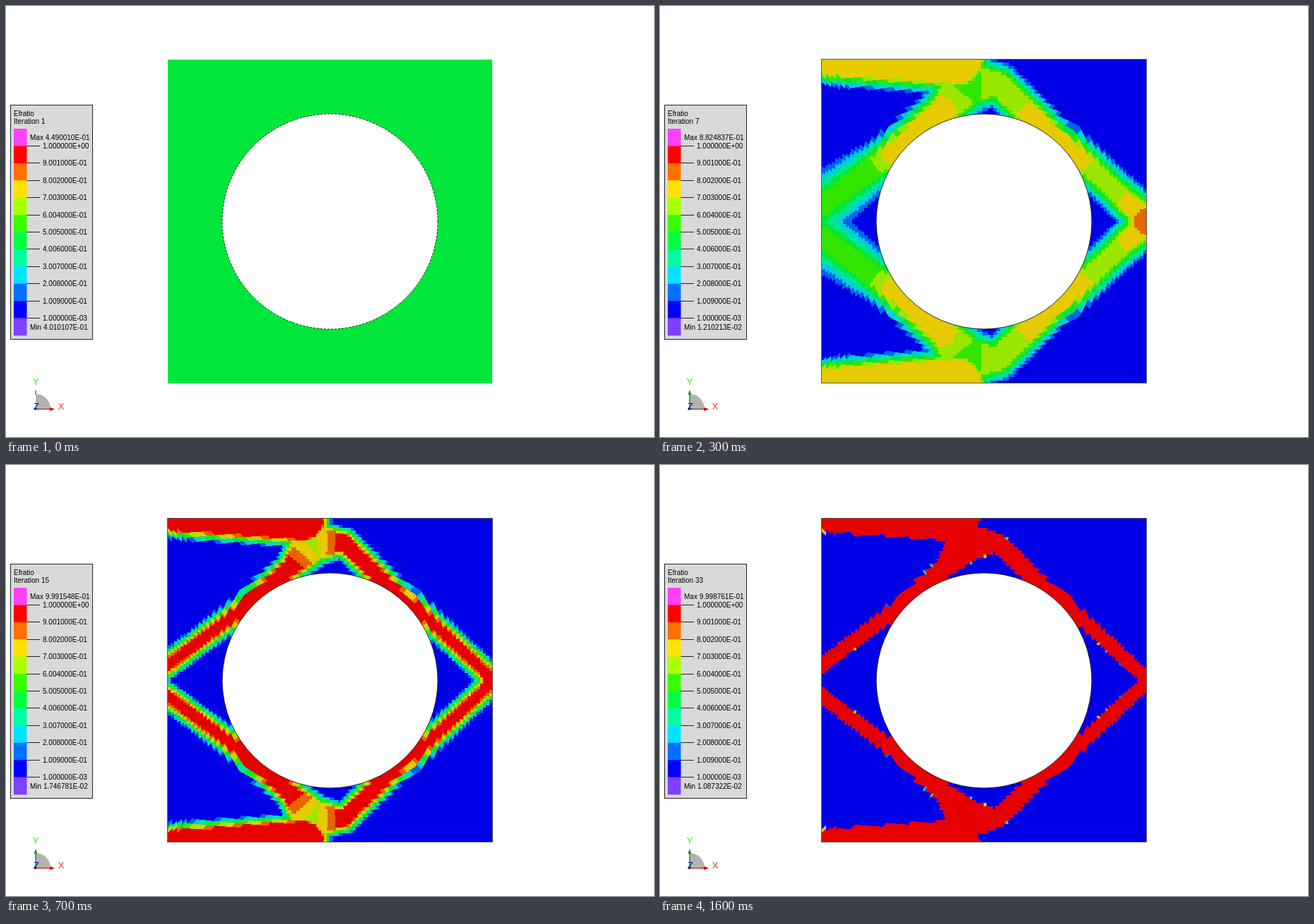
An HTML page with a canvas that plays this animation: 917 by 611 pixels, repeating every 1.65 s.

```html
<!DOCTYPE html>
<html lang="en">
<head>
<meta charset="utf-8">
<title>Topology optimisation</title>
<style>
html, body { margin: 0; width: 100%; height: 100%; overflow: hidden; background: #fff; }
canvas { position: absolute; left: 229px; top: 76px; }
svg { position: absolute; left: 0; top: 0; }
text { font-family: "Liberation Sans", Arial, sans-serif; font-size: 10px; }
.axis { font-size: 13px; text-anchor: middle; }
</style>
</head>
<body>
<canvas id="plate" width="459" height="459"></canvas>
<svg width="917" height="611" viewBox="0 0 917 611">
  <rect id="edge" x="228.5" y="75.5" width="460" height="459" fill="none" stroke="#555"/>
  <circle id="rim" cx="458.5" cy="305.5" r="152.5" fill="none" stroke="#111" stroke-width=".9"/>
  <rect x="6.5" y="140.5" width="116" height="332" fill="#d9d9d9" stroke="#222"/>
  <text x="11" y="156">Efratio</text>
  <text id="iter" x="11" y="167"></text>
  <g id="legend"></g>
  <text id="max" x="34" y="189.5"></text>
  <text id="min" x="34" y="458.5"></text>
  <path d="M42 571V550A21 21 0 0 1 63 571Z" fill="#b2b2b2"/>
  <path d="M42 571.5H64" stroke="#c00000"/>
  <path d="M62 569L69 571.5L62 574Z" fill="#d00000"/>
  <path id="stem" stroke="#009a20" stroke-width="1.4"/>
  <path id="head" d="M39.5 551L42 544L44.5 551Z" fill="#00a020"/>
  <circle cx="41.5" cy="571" r="1.8" fill="#0000e0"/>
  <text class="axis" x="42" y="537" fill="#20f020">Y</text>
  <text class="axis" x="78" y="572" fill="#ff3030">X</text>
  <text class="axis" x="43" y="572" fill="#101080">Z</text>
</svg>
<script>
const start = performance.now();
const $ = id => document.getElementById(id);
const STEP = 50, COUNT = 33, SIZE = 459, MID = 229, HALF = 229.5, R = 152.5;
const CX = 458.5, CY = 305.5;
const clamp = (v, a = 0, b = 1) => Math.min(b, Math.max(a, v));
const mix = (a, b, u) => a + (b - a) * u;

// Ten colour bands from blue through green to red
const rgb = i => {
  const ramp = k => Math.round(255 * clamp(k));
  return [ramp((i - 4.4) / 1.5 * .9 - .16 + (i > 6 ? .1 : 0)), 0, 0] && [
    i < 5 ? 0 : ramp(.222 + (i - 5) * .444),
    i < 5 ? ramp(i * .444) : ramp((9 - i) * .444),
    i < 5 ? ramp(1 - (i - 2) * .37) : 0
  ];
};
const BANDS = Array.from({ length: 10 }, (_, i) => rgb(i));
const shade = BANDS.map(c => c.reduce((n, v, k) => n + Math.round(v * .9) * 256 ** k, 255 * 256 ** 3));
const bandOf = v => clamp(Math.floor((v - .001) / .0999), 0, 9);

const sci = v => v.toExponential(6).replace(/e([+-])(\d)$/, 'E$10$2');

function buildLegend() {
  const colors = [[255, 64, 255], ...BANDS.slice().reverse(), [128, 64, 255]];
  const h = 293 / 12;
  $('legend').innerHTML = colors.map((c, i) => {
    const y = 174 + i * h;
    const box = `<rect x="11" y="${y}" width="18.5" height="${h + .3}" fill="rgb(${c})"/>`;
    if (!i) return box;
    const line = Math.floor(y) + .5;
    return box + `<path d="M29.5 ${line}H48" stroke="#222"/>` +
      `<text x="52" y="${line + 3}">${sci(1 - (i - 1) * .0999)}</text>`;
  }).join('');
}

// Stages: soft edge begins at `from` outside a bar and is `soft` wide; `loose` scales the bars' own spread
const STAGES = [
  { n: 1, max: .449001, min: .4010107, flat: .43 },
  { n: 5, max: .6853384, min: .01153274, from: 4, soft: 22, loose: 1, base: .14 },
  { n: 7, max: .8824837, min: .01210213, from: 1, soft: 22, loose: .5, base: .03 },
  { n: 11, max: .9990969, min: .01373043, from: -6, soft: 21, loose: .3, base: .02 },
  { n: 15, max: .9991548, min: .01746781, from: -4, soft: 15, loose: 0, base: .02 },
  { n: 21, max: .9998942, min: .01159847, from: -2, soft: 7, loose: 0, base: .02 },
  { n: 33, max: .9998761, min: .01087322, from: -.1, soft: .2, loose: 0, base: .02 }
];

// Bars of the upper half; joint: x, y, radius, spread, strength at successive stages (then 1)
const joint = (x, y, r, spread, ...peaks) => ({ x, y, r, spread, peaks });
const CHAINS = [
  [joint(200, 74, 19, .7, .55, .76), joint(420, 76, 32, .8, .54, .74)],
  [
    joint(200, 305, 10, 2.8, .37, .5, .8),
    joint(300, 230, 10.5, 1.5, .45, .57, .88),
    joint(327, 210, 11, 1, .56, .74),
    joint(402, 146, 14, 1, .55, .75),
    joint(434, 110, 29, .8, .46, .54, .58, .64, .78),
    joint(478, 110, 13, .8, .47, .66),
    joint(557, 187, 12, .8, .55, .75),
    joint(583, 205, 10, .9, .55, .74),
    joint(640, 258, 10, 1, .47, .64),
    joint(690, 305, 10, 1, .63, .86)
  ]
];

// Weak (or, if negative, strong) patches of the first visible pattern: x, y, rx, ry, depth
const PATCHES = [
  [255, 150, 66, 26, .12], [573, 117, 30, 16, .08], [646, 176, 17, 25, .08], [688, 76, 50, 50, .1],
  [302, 305, 13, 22, .16], [611, 305, 9, 16, .12], [561, 76, 46, 11, -.09], [688, 190, 8, 27, -.09]
];

function field(stage, k, x, y) {
  if (stage.flat) return stage.flat;
  let v = stage.base;
  for (const chain of CHAINS) for (let i = 1; i < chain.length; i++) {
    const a = chain[i - 1], b = chain[i], ex = b.x - a.x, ey = b.y - a.y;
    const u = clamp(((x - a.x) * ex + (y - a.y) * ey) / (ex * ex + ey * ey));
    const gap = Math.hypot(x - a.x - u * ex, y - a.y - u * ey) - mix(a.r, b.r, u);
    const spread = 1 + (mix(a.spread, b.spread, u) - 1) * stage.loose;
    const peak = mix(a.peaks[k - 1] ?? 1, b.peaks[k - 1] ?? 1, u);
    const f = clamp(1 - ((gap > 0 ? gap / spread : gap) - stage.from) / stage.soft);
    v = Math.max(v, mix(stage.base, peak, f));
  }
  if (k === 1) for (const [px, py, rx, ry, depth] of PATCHES) {
    const q = ((x - px) / rx) ** 2 + ((y - py) / ry) ** 2;
    v -= depth * Math.exp(-q * q);
  }
  return Math.max(.012, v);
}

// Mesh of one quadrant: rays from the hole to the sides, sector 0 beside and 1 above the hole
const RAYS = 50, LAYERS = 18;
const rayPoint = (s, t) => {
  const a = s * Math.PI / 4;
  return [mix(R * Math.sin(a), HALF * s, t), mix(R * Math.cos(a), HALF, t)];
};
const cellId = (sector, i, k) => (sector * LAYERS + k) * RAYS + i;
const slot = (u, n) => clamp(Math.floor(u * n), 0, n - 1);

function buildMap() {
  const map = new Int16Array((MID + 1) ** 2).fill(-1);
  for (let y = 0; y <= MID; y++) for (let x = 0; x <= MID; x++) {
    if (Math.hypot(x, y) < R) continue;
    const u = Math.min(x, y), v = Math.max(x, y);
    let lo = 0, hi = 1, t = 0;
    for (let n = 0; n < 12; n++) {
      const s = (lo + hi) / 2, base = R * Math.cos(s * Math.PI / 4);
      t = (v - base) / (HALF - base);
      if (rayPoint(s, t)[0] < u) lo = s; else hi = s;
    }
    map[y * (MID + 1) + x] = cellId(y > x ? 1 : 0, slot(lo, RAYS), slot(t, LAYERS));
  }
  return map;
}

function buildCells() {
  const cells = [];
  for (const sector of [0, 1]) for (let k = 0; k < LAYERS; k++) for (let i = 0; i < RAYS; i++) {
    const [u, v] = rayPoint((i + .5) / RAYS, (k + .5) / LAYERS);
    const [dx, dy] = sector ? [u, v] : [v, u];
    for (const side of [0, 1])
      cells[cellId(sector, i, k) * 2 + side] =
        STAGES.map((stage, j) => field(stage, j, CX + (side ? -dx : dx), CY - dy));
  }
  return cells;
}

buildLegend();
const map = buildMap(), cells = buildCells();
const ctx = $('plate').getContext('2d');
const image = ctx.createImageData(SIZE, SIZE);
const pixels = new Uint32Array(image.data.buffer);
const tint = new Uint32Array(cells.length);

function draw(n) {
  let k = 0;
  while (k < STAGES.length - 2 && n >= STAGES[k + 1].n) k++;
  const a = STAGES[k], b = STAGES[k + 1], lin = (n - a.n) / (b.n - a.n);
  const u = k === STAGES.length - 2 ? 1 - (1 - lin) ** 2 : lin;

  cells.forEach((c, i) => { tint[i] = shade[bandOf(mix(c[k], c[k + 1], u))]; });
  for (let y = 0, p = 0; y < SIZE; y++) for (let x = 0; x < SIZE; x++, p++) {
    const id = map[Math.abs(y - MID) * (MID + 1) + Math.abs(x - MID)];
    pixels[p] = id < 0 ? 0xffffffff : tint[id * 2 + (x < MID ? 1 : 0)];
  }
  ctx.putImageData(image, 0, 0);

  $('iter').textContent = 'Iteration ' + n;
  $('max').textContent = 'Max ' + sci(mix(a.max, b.max, u));
  $('min').textContent = 'Min ' + sci(a.min * (b.min / a.min) ** u);
  const first = n === 1;
  $('edge').style.display = $('head').style.display = first ? 'none' : '';
  $('rim').setAttribute('stroke-dasharray', first ? '3 2' : 'none');
  $('stem').setAttribute('d', first ? 'M42 551V545' : 'M42 571V549');
}

let shown = 0;
function tick() {
  const t = Math.max(0, performance.now() - start) % (STEP * COUNT);
  const n = Math.floor(t / STEP) + 1;
  if (n !== shown) draw(shown = n);
  requestAnimationFrame(tick);
}
tick();
</script>
</body>
</html>
```
